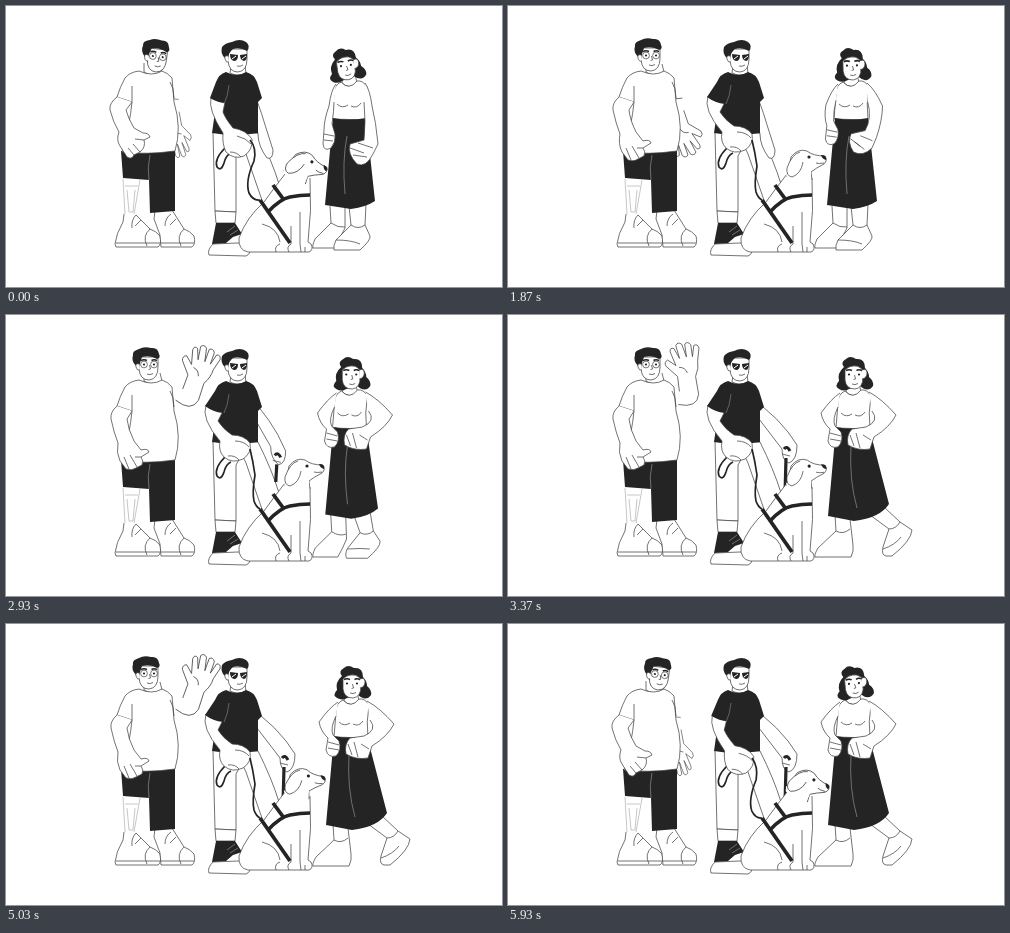
Animation, 496 px wide and 281 px high, one loop 6010 ms. Source, as an HTML page with a canvas:

```html
<!DOCTYPE html>
<html lang="en">
<head>
<meta charset="utf-8">
<title>Three friends and a guide dog</title>
<style>
html, body { margin: 0; width: 100%; height: 100%; overflow: hidden; background: #fff; }
canvas { display: block; width: 496px; height: 281px; }
</style>
</head>
<body>
<canvas id="stage"></canvas>
<script>
const W = 496, H = 281, LOOP = 6010;
const INK = '#242424', LINE = '#444', CREASE = '#888', PALE = '#b4b4b4', WHITE = '#fff';
const canvas = document.getElementById('stage');
const ctx = canvas.getContext('2d');
const dpr = window.devicePixelRatio || 1;
canvas.width = W * dpr;
canvas.height = H * dpr;
ctx.lineJoin = 'round';

const lerp = (a, b, p) => a + (b - a) * p;
const ease = p => p < 0.5 ? 2 * p * p : 1 - 2 * (1 - p) * (1 - p);

// Eased value at time t along [time, value] keys.
function track(t, ...keys) {
  if (t <= keys[0][0]) return keys[0][1];
  for (let i = 1; i < keys.length; i++) {
    const [t0, v0] = keys[i - 1], [t1, v1] = keys[i];
    if (t < t1) return lerp(v0, v1, ease((t - t0) / (t1 - t0)));
  }
  return keys[keys.length - 1][1];
}

// Blends two paths that share the same commands.
function morph(a, b, p) {
  const ends = b.match(/-?[\d.]+/g);
  let i = 0;
  return a.replace(/-?[\d.]+/g, n => lerp(+n, +ends[i++], p).toFixed(2));
}

function line(d, color = LINE, width = 0.75) {
  ctx.strokeStyle = color;
  ctx.lineWidth = width;
  ctx.stroke(new Path2D(d));
}
function fill(d, color = INK) {
  ctx.fillStyle = color;
  ctx.fill(new Path2D(d));
}
function shape(d) {
  fill(d, WHITE);
  line(d);
}
function dot(x, y, r) {
  ctx.fillStyle = INK;
  ctx.beginPath();
  ctx.arc(x, y, r, 0, 7);
  ctx.fill();
}
function ring(x, y, r) {
  ctx.strokeStyle = LINE;
  ctx.lineWidth = 0.7;
  ctx.beginPath();
  ctx.arc(x, y, r, 0, 7);
  ctx.stroke();
}
function at(x, y, degrees, draw) {
  ctx.save();
  ctx.translate(x, y);
  ctx.rotate(degrees * Math.PI / 180);
  draw();
  ctx.restore();
}

const FACE = 'M-9 -6 L-9 6 Q-8 17 1 17 Q10 16 10 4 L10 -6 Z';
const EAR = 'M-9 1 Q-13 0 -12 4 Q-11 8 -8 7';

function eyesAndMouth() {
  dot(-4, 1.5, 1.1);
  dot(6, 1.5, 1.1);
  line('M-7 -2.5 Q-4 -4 -1 -2.5 M3.5 -2.5 Q6 -4 9 -2.5', INK, 1.6);
  line('M1.5 2 L2.5 6 L0.5 6.5 M-1 11 Q2 12.5 5 10.5');
}

function waver(t) {
  const look = track(t, [450, 0], [1930, 1], [5050, 1], [5900, 0]);
  const raise = track(t, [2000, 0], [2530, 1], [5150, 1], [5820, 0]);
  const open = track(t, [700, 0], [1870, 1], [5300, 1], [5900, 0]);
  const wave = 10 + 15 * Math.sin((t - 2570) / 700 * 2 * Math.PI - 2);
  const angle = lerp(lerp(172, 165, open), wave, raise);

  at(lerp(167, 179, raise), lerp(97, 86, raise), angle, () => {
    ctx.scale(lerp(0.68, 1, Math.max(open * 0.8, raise)), lerp(0.94, 1, raise));
    shape('M-9 3 Q10 8 12 -6 L10 -24 Q14 -32 13 -40 L15 -52 Q14 -57 10 -55' +
      'L8 -44 L7 -56 Q4 -60 1 -57 L2 -44 L-2 -57 Q-6 -60 -8 -56 L-5 -43' +
      'L-10 -53 Q-14 -55 -14 -50 L-9 -36 L-17 -42 Q-21 -40 -19 -36 L-8 -25 L-7 -10');
    line('M-6 -34 Q0 -34 2 -28');
  });

  line('M117 173 L119 208 M134 174 L128 208 M119 180 L132 180 M121 184 L123 206 L127 206 L129 184', PALE);
  shape('M118 208 L117 216 Q110 228 109 238 L110 241 L152 241' +
    'Q156 238 154 230 Q150 225 144 223 L130 209');
  line('M110 237 L154 237 M141 240 Q136 230 144 223 M130 209 Q125 214 126 222 M135 214 L129 220');
  shape('M149 204 L148 213 L154 229 L155 241 L186 241 Q190 238 188 230 Q184 225 178 223 L166 204');
  line('M155 237 L188 237 M175 240 Q170 230 178 223 M165 208 Q159 212 159 220 M170 213 L164 219');
  fill('M115 145 L169 145 L169 205 L144 207 L143 174 L117 172 Z');
  line('M144 149 Q141 162 143 174', CREASE);

  shape('M138 57 L138 66 Q147 72 156 66 L154 58');
  shape('M133 65 Q124 66 119 72 Q114 81 111 91 L126 96 Q124 118 116 146' +
    'Q140 149 169 145 Q176 122 168 96 L166 72 Q162 67 156 65 Q146 71 133 65 Z');
  line('M126 80 L126 96 M168 92 Q168 82 164 76');

  shape(morph(
    'M111 91 Q103 97 104 104 Q107 116 113 126 Q110 134 114 140 L121 151 Q126 154 128 149' +
    'L134 146 Q140 141 138 134 L144 131 Q143 127 137 127 L128 122 Q122 112 120 104 L126 96',
    'M111 91 Q104 97 105 104 Q108 118 112 128 Q110 138 114 146 L120 154 Q126 156 130 153' +
    'L136 150 Q138 146 135 142 L143 137 Q142 133 135 135 L128 126 Q122 114 121 104 L126 96', look));
  line(morph('M122 142 L128 149 M127 138 L134 146 M129 133 L138 134',
    'M118 142 L123 154 M124 140 L131 152 M129 142 L135 142', look));

  at(lerp(151, 142, look), lerp(49, 48, look), lerp(7, 0, look), () => {
    shape(FACE);
    fill('M-12 3 Q-17 -2 -15 -8 Q-16 -12 -9 -14 Q-4 -17 3 -15 Q10 -16 11 -9' +
      'Q13 -5 9 -4 Q3 -8 -6 -6 L-9 3 Z');
    shape(EAR);
    eyesAndMouth();
    ring(-4, 1.5, 3.4);
    ring(6, 1.5, 3.4);
  });
}

function guide(t, sway) {
  const reach = track(t, [2500, 0], [3300, 1]);

  shape('M230 127 L252 127 Q266 155 273 178 L258 200 L240 148 Z');
  shape('M207 126 L209 205 L230 206 L230 150 L242 128 Z');
  shape('M209 205 L210 217 L229 217 L230 206 Z');
  shape('M207 238 Q201 244 203 249 L240 250 Q245 248 244 242 Q240 237 232 237 Z');
  fill('M210 217 L229 217 L236 228 L227 231 L220 237 L206 238 Z');
  line('M221 226 L229 220 M224 229 L232 224', CREASE);

  shape(morph(
    'M250 92 Q256 108 260 122 L267 144 Q267 154 261 152 Q252 140 252 128 L246 104',
    'M254 91 Q270 104 280 117 L289 130 Q289 145 281 148 Q274 146 274 134 L251 104', reach));
  if (reach > 0.1) {
    const x = lerp(261, 278, reach), y = lerp(148, 133, reach);
    line(`M${x} ${y + 10} L${x - 1} ${lerp(y + 10, 180, reach)}`, INK, 3.2);
    line(`M${x - 2} ${y + 1} Q${x + 1} ${y - 3} ${x + 4} ${y + 3}`, INK, 3);
    line(`M${x - 4} ${y + 6} L${x + 4} ${y + 8}`);
  }

  shape('M225 60 L224 67 Q232 71 240 67 L239 60');
  fill('M220 66 Q231 72 240 66 Q248 68 251 76 L256 92 L252 96 L252 127 Q228 131 206 127 L211 92 Z');

  line('M219 142 Q208 153 211 161 Q215 166 218 157 Q220 149 225 147', INK, 1.7);
  shape(morph(
    'M205 92 Q202 104 217 127 Q216 138 220 146 Q228 154 238 150 Q247 144 246 133 Q240 124 227 122 Q219 112 217 106 L219 96',
    'M200 90 Q195 104 214 126 Q212 136 218 142 Q226 149 237 144 Q246 138 244 128 Q238 120 226 120 Q217 114 212 106 L217 96', sway));
  line(morph('M231 130 Q240 132 245 138 M224 146 Q231 146 235 151',
    'M229 126 Q238 126 243 132 M222 141 Q229 140 233 145', sway));
  fill(morph('M220 66 Q213 68 210 76 L204 92 Q212 97 220 97 Z',
    'M220 66 Q212 68 209 76 L199 91 Q207 97 217 98 Z', sway));
  line('M223 79 Q222 90 218 98', '#777');

  at(231, 49, 0, () => {
    shape(FACE);
    fill('M-12 3 Q-17 -1 -15 -8 Q-12 -12 -5 -13 Q3 -17 9 -13 Q14 -9 10 -4' +
      'Q3 -8 -4 -6 Q-8 -3 -9 3 Z');
    shape(EAR);
    fill('M-7 -1 L1 0 Q1 6 -3 6 Q-7 5 -7 -1 Z M3 0 L10 -1 Q10 6 7 6 Q3 5 3 0 Z');
    line('M-5 4 L-1 1 M5 4 L9 1', WHITE, 1);
    line('M0 11 Q3 12 6 10');
  });
}

function dog(t, sway) {
  const nod = track(t, [330, 24], [1870, 0], [2900, 0], [4300, 3], [5100, 6], [5900, 24]);
  shape('M279 168 Q268 182 258 196 Q240 212 233 232 Q232 244 242 246 L303 246' +
    'Q308 244 305 238 L302 236 Q306 205 304 172');
  line('M256 218 Q272 222 274 236 M274 238 Q268 240 270 246 M285 220 L285 238' +
    'M294 206 L294 238 M285 238 Q280 241 283 246 M294 238 L295 246 M299 241 L299 246');
  line('M254 194 L284 237', INK, 3.8);
  line('M267 179 L278 194', INK, 3.8);
  line('M262 206 Q274 193 284 191 Q294 189 304 189', INK, 3.6);
  line(morph('M244 134 Q251 142 248 155 Q239 175 243 187 Q247 195 254 194',
    'M244 134 Q247 146 249 160 Q246 178 248 186 Q250 192 254 194', sway), INK, 1.7);

  at(292, 165, nod, () => {
    shape('M-13 6 L-9 -14 Q-2 -23 7 -20 Q13 -15 25 -15 Q28 -11 24 -7 Q16 -3 11 1 L12 9');
    fill('M-14 3 L11 0 L11 12 L-12 8 Z', WHITE);
    shape('M0 -19 Q-8 -17 -13 -3 Q-14 5 -8 6 Q1 3 3 -9');
    dot(9, -14, 1.6);
    fill('M21 -16 Q27 -16 26 -11 Q22 -12 21 -16 Z');
    line('M24 -8 Q19 -7 16 -8');
  });
}

function woman(t) {
  const turn = track(t, [400, 0], [2550, 1]);
  const hips = track(t, [1400, 0], [2420, 1]);
  const step = track(t, [2700, 0], [3350, 1]);
  const tilt = lerp(-8, 0, turn) + track(t, [4900, 0], [5900, -5]);
  const shift = 2 * step;

  shape(morph(
    'M324 200 L325 217 L309 233 Q306 240 307 242 L328 242 Q334 232 339 222 L339 200',
    'M327 200 L328 216 L310 233 Q306 240 307 242 L343 242 Q346 236 345 230 L342 204', step));
  shape(morph(
    'M343 200 L345 219 L330 234 Q327 240 328 244 L354 244 Q365 234 364 230 L359 219 L360 198',
    'M362 200 L381 214 L375 232 Q373 240 378 241 L384 241 Q403 226 404 215 L392 207 L376 192', step));
  line(morph('M325 217 Q332 222 339 221 M345 219 Q352 224 359 219 M330 234 Q345 234 354 238',
    'M328 216 Q335 220 342 214 M381 214 Q388 214 392 207 M375 234 Q387 230 393 222', step));

  at(shift, 0, 0, () => {
    shape('M337 68 L336 77 Q343 84 351 77 L349 68');
    shape('M335 76 Q328 79 328 88 L326 113 L360 114 Q358 98 361 81 Q357 74 351 75 Q343 85 335 76 Z');
    line('M331 98 Q336 103 342 99 M345 100 Q351 103 355 97');
  });
  fill(morph('M327 112 Q343 115 360 112 L369 195 Q360 201 345 203 L319 199 Z',
    'M328 112 Q343 115 361 112 L381 189 Q372 203 346 206 L320 201 Z', step));
  line(morph('M341 130 Q336 155 339 188', 'M343 130 Q341 165 349 193', step), CREASE);

  at(shift, 0, 0, () => {
    shape(morph(
      'M330 78 Q325 84 323 100 Q318 114 318 124 L317 138 Q318 146 325 142 Q330 136 329 128 L326 118 Q328 104 328 96',
      'M330 78 Q321 84 311 98 Q313 108 320 114 L318 126 Q320 134 328 132 Q334 126 331 117 L325 111 Q322 104 328 92', hips));
    line(morph('M318 128 L328 130 M318 134 L327 135', 'M320 118 L331 121 M320 124 L331 126', hips));
    shape(morph(
      'M359 77 Q364 84 366 100 Q370 116 372 138 L367 148 Q360 162 351 158 Q341 148 344 138 L358 134 Q360 116 358 96',
      'M359 77 Q372 84 386 100 Q380 112 364 122 L360 134 Q348 136 338 130 Q336 120 342 114 L356 112 Q370 106 362 96', hips));
    line(morph('M344 142 L358 147 M347 149 L361 151 M352 137 L367 142',
      'M340 120 L344 131 M346 118 L350 133 M353 120 L361 125', hips));
  });

  at(lerp(340, 345, turn) + shift / 2, 60, tilt, () => {
    fill('M-10 -8 Q-17 -2 -15 6 Q-20 11 -15 14 Q-10 17 -5 14 L6 11 Q14 18 19 11' +
      'Q20 6 15 2 Q15 -3 11 -7 Q11 -17 2 -16 Q-4 -20 -8 -16 Q-14 -13 -10 -8 Z');
    shape('M-9 -5 L-9 5 Q-8 14 1 14 Q9 13 9 2 L8 -6 Q4 -10 -1 -9 Q-5 -9 -9 -5 Z');
    shape('M8 -5 Q13 -7 13 -2 Q13 3 8 4');
    at(-1, -2, 0, eyesAndMouth);
  });
}

function draw(t) {
  const sway = track(t, [330, 0], [1600, 1], [5050, 1], [5930, 0.15]);
  ctx.setTransform(dpr, 0, 0, dpr, 0, 0);
  ctx.fillStyle = WHITE;
  ctx.fillRect(0, 0, W, H);
  waver(t);
  guide(t, sway);
  woman(t);
  dog(t, sway);
}

const start = performance.now();
function tick() {
  draw((performance.now() - start) % LOOP);
  requestAnimationFrame(tick);
}
tick();
</script>
</body>
</html>
```
